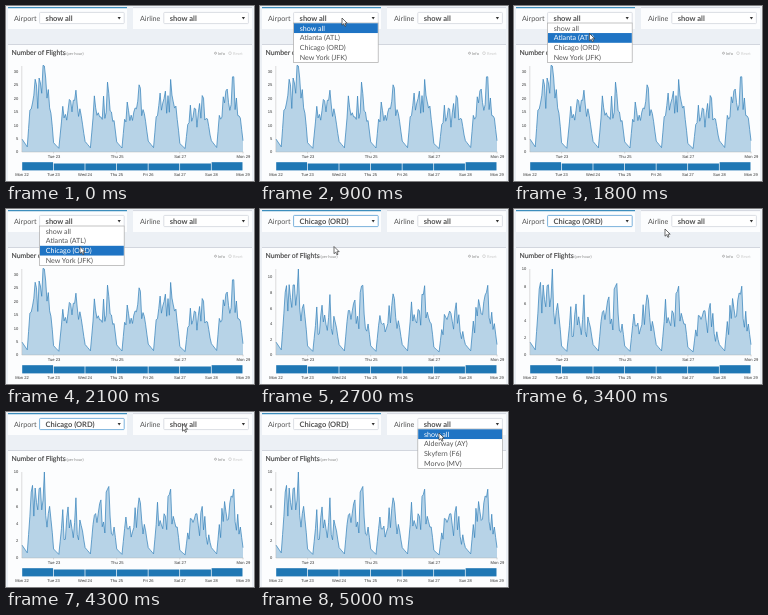
Animation of 248 by 175 pixels, one loop 5100 ms. Source, as an HTML page:

```html
<!DOCTYPE html>
<html lang="en">
<head>
<meta charset="utf-8">
<title>Flights dashboard</title>
<style>
  html, body { margin: 0; width: 100%; height: 100%; overflow: hidden; background: #ecf0f5; }
  svg { display: block; width: 248px; height: 175px; font-family: Lato, sans-serif; text-rendering: geometricPrecision; }
  .label { font-size: 7.2px; fill: #555; }
  .value { font-size: 7.5px; font-weight: bold; fill: #505050; }
  .option { font-size: 7.1px; fill: #555; }
  .title { font-size: 6.9px; fill: #444; stroke: #444; stroke-width: .15; }
  .small { font-size: 4px; fill: #888; }
  .axis text { font: 4.1px "Liberation Sans", Arial, sans-serif; fill: #333; }
  .axis path { fill: none; stroke: #aaa; stroke-width: .4; }
  .select { fill: #fff; stroke: #d2d6de; stroke-width: .8; }
  .focus .select { stroke: #5a9fd4; }
  .on rect { fill: #1f74c4; }
  .on text { fill: #fff; }
</style>
</head>
<body>
<svg viewBox="0 0 248 175">
  <rect width="248" height="175" fill="#ecf0f5"/>
  <path d="M2 1h119v22H2zM127 1h119v22H127zM2 38h244v137H2z" fill="#fcfdfe"/>
  <path d="M2 1.6h119" stroke="#3c8dbc" stroke-width="1.2"/>
  <path d="M127 1.6h119M2 38.5h244" stroke="#d2d6de"/>

  <text class="title" x="5.5" y="49.2">Number of Flights</text>
  <text class="small" x="60.5" y="49">(per hour)</text>
  <g fill="none" stroke-width=".7">
    <circle cx="209.5" cy="47.2" r="1" stroke="#999"/>
    <circle cx="224" cy="47.2" r="1.4" stroke="#ccc"/>
  </g>
  <text class="small" x="212" y="48.8">Info</text>
  <text class="small" x="227" y="48.8" style="fill:#ccc">Reset</text>

  <path id="area" fill="#b7d3e7"/>
  <path id="line" fill="none" stroke="#3b86bc" stroke-width=".75" stroke-linejoin="round"/>
  <g class="axis" id="axis"><path d="M15.8 60V146H237.5"/></g>
  <g id="bars" fill="#1f77b4"></g>

  <g id="controls"></g>
  <path id="cursor" d="M0 0V7.2L1.7 5.7 2.9 8.3 4 7.8 2.9 5.2H5.2Z" fill="#fff" stroke="#333" stroke-width=".7"/>
</svg>
<script>
const LOOP = 5100, STEP = 100;
const LEFT = 16, DAY = 31.57, BASE = 146, HEIGHT = 86;
const $ = id => document.getElementById(id);

function add(parent, tag, attrs, text) {
  const el = document.createElementNS('http://www.w3.org/2000/svg', tag);
  for (const k in attrs) el.setAttribute(k, attrs[k]);
  if (text !== undefined) el.textContent = text;
  return parent.appendChild(el);
}
const show = (el, on) => el.setAttribute('visibility', on ? 'visible' : 'hidden');
const mix = (a, b, p) => a + (b - a) * p;
const noise = n => { const s = Math.sin(n * 12.9898) * 43758.5453; return s - Math.floor(s); };

// Share of the daily peak: quiet until 4:00, steep rise, busy day, evening fall
function traffic(k) {
  if (k < 4) return mix(.15, .06, k / 4);
  if (k < 7) return mix(.06, .7, (k - 4) / 3);
  if (k < 20) return .78 + .22 * Math.exp(-(((k - 17) / 2) ** 2));
  return mix(.75, .15, (k - 20) / 4);
}
// Hourly flights for a week; busy hours drop at random, at most to the given floor
function week(peaks, floor, seed) {
  return Array.from({ length: 169 }, (_, h) => {
    const k = h % 24, peak = peaks[Math.min(6, Math.floor(h / 24))];
    const busy = k > 6 && k < 22 && k !== 17;
    return peak * traffic(k) * (busy ? mix(floor, 1.1, noise(h + seed)) : 1);
  });
}
const all = week([32, 23, 26, 25, 27, 21, 28], .55, 0);
const chicago = week([10, 7, 8, 7, 8, 6, 8], .35, 500);

// Axis labels and the range bars
const axis = $('axis'), names = ['Mon', 'Tue', 'Wed', 'Thu', 'Fri', 'Sat', 'Sun', 'Mon'];
names.forEach((name, i) => {
  const x = LEFT + i * DAY, text = `${name} ${22 + i}`;
  add(axis, 'text', { x, y: 170.4, 'text-anchor': 'middle' }, text);
  if (i % 2) {
    add(axis, 'text', { x: x + .4, y: 152, 'text-anchor': 'middle' }, text);
    add(axis, 'path', { d: `M${x} 146v1.5` });
  }
  if (i < 7) {
    const y = i % 6 ? 157.5 : 156.2;
    add($('bars'), 'rect', { x: x + .2, y, width: DAY - .7, height: 164.4 - y });
  }
});
const ticks = Array.from({ length: 7 }, () => add(axis, 'text', { x: 12.3, 'text-anchor': 'end' }));

function drawChart(p) {
  const max = mix(32, 10, p), scale = HEIGHT / max;
  const d = all.map((v, h) =>
    `${(LEFT + h * DAY / 24).toFixed(2)} ${(BASE - mix(v, chicago[h], p) * scale).toFixed(2)}`).join('L');
  $('line').setAttribute('d', 'M' + d);
  $('area').setAttribute('d', `M${LEFT} ${BASE}L${d}V${BASE}Z`);
  const step = max > 12 ? 5 : 2;
  ticks.forEach((el, i) => {
    el.textContent = i * step;
    el.setAttribute('y', BASE - i * step * scale + 1.4);
    show(el, i * step <= max + .01);
  });
}

function dropdown(label, labelX, x, options) {
  const width = 84.6, top = 17.3, rowHeight = 9.75;
  const g = add($('controls'), 'g');
  add(g, 'text', { class: 'label', x: labelX, y: 14.8 }, label);
  add(g, 'rect', { class: 'select', x, y: 6.4, width, height: 11.2, rx: .8 });
  const value = add(g, 'text', { class: 'value', x: x + 6, y: 14.6 }, options[0]);
  add(g, 'path', { d: `M${x + 78} 11h3.2l-1.6 2.6z`, fill: '#333' });
  const menu = add(g, 'g');
  add(menu, 'rect', { x, y: 17, width, height: 39.6, fill: '#fff', stroke: '#aaa', 'stroke-width': .7 });
  const rows = options.map((text, i) => {
    const row = add(menu, 'g'), y = top + rowHeight * i;
    add(row, 'rect', { x: x + .4, y, width: width - .8, height: rowHeight, fill: 'none' });
    add(row, 'text', { class: 'option', x: x + 6.2, y: y + 7.4 }, text);
    return row;
  });
  return (open, pointerY, chosen, focus) => {
    const active = Math.max(0, Math.floor((pointerY - top) / rowHeight));
    show(menu, open);
    rows.forEach((row, i) => row.setAttribute('class', i === active ? 'on' : ''));
    value.textContent = options[chosen];
    g.setAttribute('class', focus ? 'focus' : '');
  };
}
const airport = dropdown('Airport', 8, 33.6, ['show all', 'Atlanta (ATL)', 'Chicago (ORD)', 'New York (JFK)']);
const airline = dropdown('Airline', 134, 157.8, ['show all', 'Alderway (AY)', 'Skyfern (F6)', 'Morvo (MV)']);

// Pointer stops: time, x, y
const stops = [
  [0, 97, -12], [400, 82, 12], [1200, 82, 12], [1800, 75.5, 27.5], [2100, 74, 37.5],
  [2700, 74, 37.5], [3400, 151, 20], [3900, 176.5, 12], [4700, 176.5, 12], [5000, 179, 21]
];
function pointer(t) {
  const i = Math.max(1, stops.findIndex(s => s[0] >= t));
  const [t0, x0, y0] = stops[i - 1], [t1, x1, y1] = stops[i];
  const p = (t - t0) / (t1 - t0);
  return [mix(x0, x1, p), mix(y0, y1, p)];
}
const easeInOut = p => p < .5 ? 4 * p ** 3 : 1 - 4 * (1 - p) ** 3;

function draw(t) {
  const [x, y] = pointer(t);
  $('cursor').setAttribute('transform', `translate(${x} ${y})`);
  const picked = t >= 2600, second = t >= 4400;
  airport(t >= 700 && !picked, y, picked ? 2 : 0, picked && !second);
  airline(second, y, 0, false);
  drawChart(easeInOut(Math.min(1, Math.max(0, (t - 2530) / 220))));
}

let last = -1;
function tick() {
  const t = Math.floor(performance.now() % LOOP / STEP) * STEP;
  if (t !== last) draw(last = t);
  requestAnimationFrame(tick);
}
tick();
</script>
</body>
</html>
```
